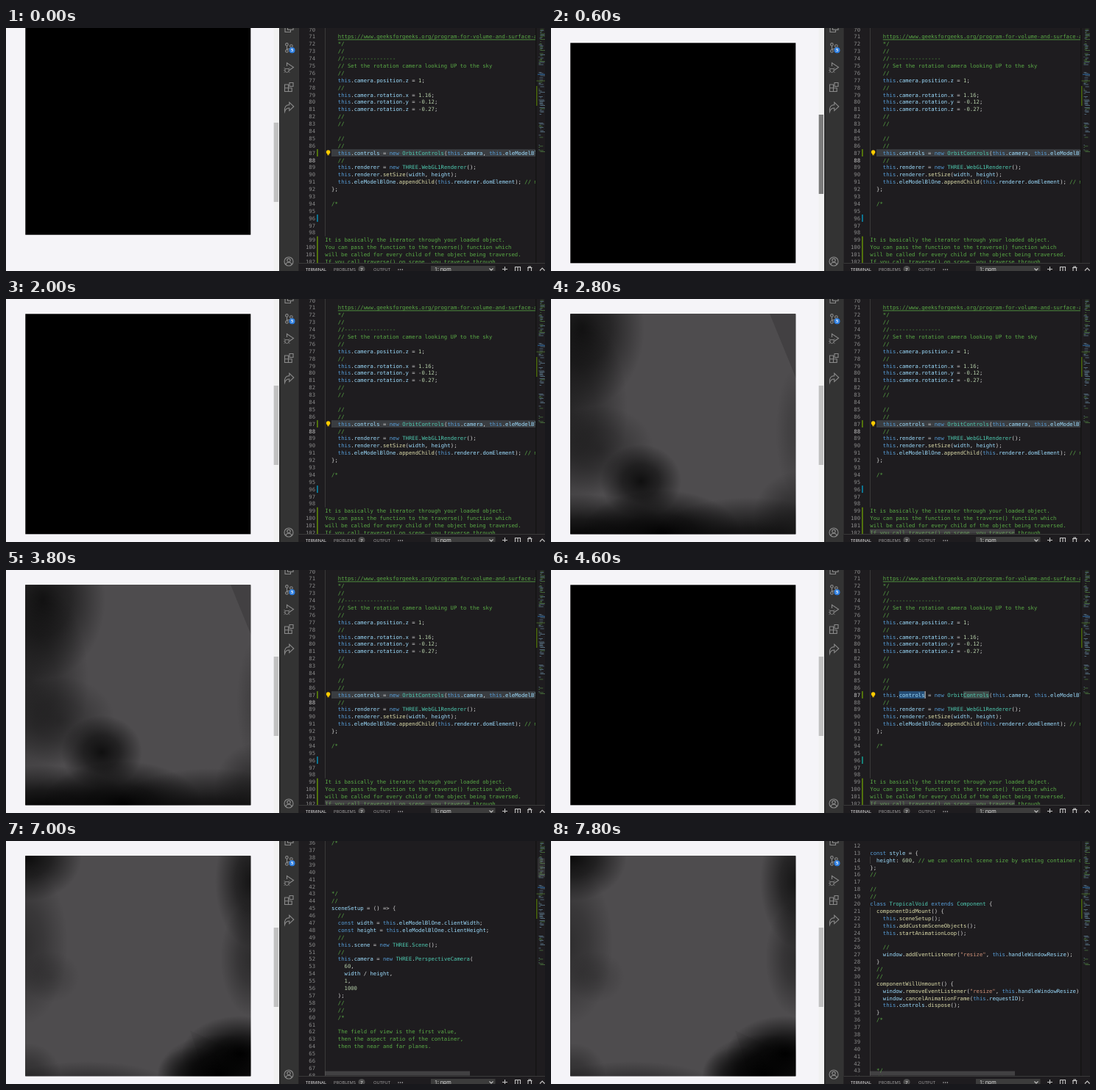
Animation, 732 px wide and 331 px high, one loop 8 s. Source, as an HTML page with a canvas:

```html
<!DOCTYPE html>
<html lang="en">
<head>
<meta charset="utf-8">
<title>Scene and editor</title>
<style>
  html, body { margin: 0; width: 100%; height: 100%; overflow: hidden; background: #f5f4f8; }
  canvas { display: block; }
</style>
</head>
<body>
<canvas id="stage" width="732" height="331"></canvas>
<script>
const ctx = document.getElementById('stage').getContext('2d');
const LOOP = 8000, STEP = 200;
const CHAR = 4.371, LINE = 9.89, CODE_X = 433.3, CODE_END = 719, CODE_BOTTOM = 320;
const FIRST = 12, SCROLL_MAX = 578;
const BOX = { x: 26.3, y: 20.3, w: 306, h: 300 };
const MONO = '7.26px "DejaVu Sans Mono", monospace';
const UI = '"Open Sans", sans-serif';

const C = {
  comment: '#5aaa46', keyword: '#569cd6', type: '#4ec9b0', call: '#dcdcaa',
  name: '#9cdcfe', number: '#b5cea8', string: '#ce9178', plain: '#d4d4d4',
  editor: '#1e1c1f', icon: '#8a8a8a'
};

const code = `
const style = {
  height: 600, // we can control scene size by setting container dimensions
};
//

//
//
class TropicalVoid extends Component {
  componentDidMount() {
    this.sceneSetup();
    this.addCustomSceneObjects();
    this.startAnimationLoop();

    //
    window.addEventListener("resize", this.handleWindowResize);
  }
  //
  //
  componentWillUnmount() {
    window.removeEventListener("resize", this.handleWindowResize);
    window.cancelAnimationFrame(this.requestID);
    this.controls.dispose();
  }
  /*






  */
  //
  sceneSetup = () => {
    //
    const width = this.eleModelBlOne.clientWidth;
    const height = this.eleModelBlOne.clientHeight;
    //
    this.scene = new THREE.Scene();
    //
    this.camera = new THREE.PerspectiveCamera(
      60,
      width / height,
      1,
      1000
    );
    //
    //
    /*

    The field of view is the first value,
    then the aspect ratio of the container,
    then the near and far planes.






    https://www.geeksforgeeks.org/program-for-volume-and-surface-area
    */
    //
    //----------------
    // Set the rotation camera looking UP to the sky
    //
    this.camera.position.z = 1;
    //
    this.camera.rotation.x = 1.16;
    this.camera.rotation.y = -0.12;
    this.camera.rotation.z = -0.27;
    //
    //

    //
    //
    this.controls = new OrbitControls(this.camera, this.eleModelBlOne);
    //
    this.renderer = new THREE.WebGL1Renderer();
    this.renderer.setSize(width, height);
    this.eleModelBlOne.appendChild(this.renderer.domElement); // mount
  };

  /*




It is basically the iterator through your loaded object.
You can pass the function to the traverse() function which
will be called for every child of the object being traversed.
If you call traverse() on scene, you traverse through
the whole scene graph.`.split('\n');

const TOKEN = /\/\/.*|"[^"]*"|\d[\d.]*|\w+|[^\w\s"]/g;

function colorOf(word, rest) {
  if (word.startsWith('//')) return C.comment;
  if (word[0] === '"') return C.string;
  if (/^\d/.test(word)) return C.number;
  if (/^(this|new|const|class|extends)$/.test(word)) return C.keyword;
  if (/^[A-Z]/.test(word)) return C.type;
  if (/^\w/.test(word)) return rest[0] === '(' ? C.call : C.name;
  return C.plain;
}

function tokenize(text) {
  return [...text.matchAll(TOKEN)].map(m =>
    ({ col: m.index, text: m[0], color: colorOf(m[0], text.slice(m.index + m[0].length)) }));
}

let inBlock = false;
const lines = code.map(text => {
  if (text.includes('/*')) inBlock = true;
  const col = text.search(/\S/);
  const tokens = inBlock
    ? (col < 0 ? [] : [{ col, text: text.slice(col), color: C.comment }])
    : tokenize(text);
  if (text.includes('*/')) inBlock = false;
  return tokens;
});
const commented = tokenize('    // ' + code[87 - FIRST].trim());

const colX = col => CODE_X + col * CHAR;

function rect(x, y, w, h, color) {
  ctx.fillStyle = color;
  ctx.fillRect(x, y, w, h);
}

function label(text, x, y, color, font, align = 'left') {
  ctx.font = font;
  ctx.textAlign = align;
  ctx.fillStyle = color;
  ctx.fillText(text, x, y);
}

function disc(x, y, r, color) {
  ctx.fillStyle = color;
  ctx.beginPath();
  ctx.arc(x, y, r, 0, Math.PI * 2);
  ctx.fill();
}

function stroke(d, color = C.icon, width = 1.1) {
  ctx.strokeStyle = color;
  ctx.lineWidth = width;
  ctx.stroke(new Path2D(d));
}

function clip(x, y, w, h, draw) {
  ctx.save();
  ctx.beginPath();
  ctx.rect(x, y, w, h);
  ctx.clip();
  draw();
  ctx.restore();
}

// Dark patches over the cloud: x, y, rx, ry, strength
const SKY_A = [
  [42, 40, 85, 110, .75], [24, 150, 80, 140, .5], [65, 205, 75, 60, .35],
  [122, 248, 55, 50, .8], [40, 328, 130, 62, 1], [150, 322, 110, 62, 1],
  [270, 345, 150, 75, 1], [335, 295, 60, 60, .45], [335, 180, 30, 90, .2]
];
const SKY_B = [
  [28, 22, 75, 60, .85], [24, 140, 60, 110, .4], [60, 185, 40, 35, .18],
  [334, 55, 50, 90, .75], [336, 160, 45, 80, .45], [318, 290, 80, 52, 1],
  [290, 318, 85, 55, 1], [255, 320, 50, 40, .6], [110, 336, 120, 36, .45],
  [30, 320, 45, 45, .4]
];

function patch([x, y, rx, ry, a]) {
  ctx.save();
  ctx.translate(x, y);
  ctx.scale(rx, ry);
  const g = ctx.createRadialGradient(0, 0, 0, 0, 0, 1);
  g.addColorStop(0, `rgba(0,0,0,${a})`);
  g.addColorStop(.45, `rgba(0,0,0,${a * .68})`);
  g.addColorStop(1, 'rgba(0,0,0,0)');
  ctx.fillStyle = g;
  ctx.fillRect(-1, -1, 2, 2);
  ctx.restore();
}

function wedge(d, color) {
  ctx.fillStyle = color;
  ctx.fill(new Path2D(d));
}

function drawSky(t) {
  const early = t < 4200;
  rect(BOX.x, BOX.y, BOX.w, BOX.h, '#4e4c4e');
  ctx.save();
  if (early) ctx.translate((t - 2800) * .008, 0);
  (early ? SKY_A : SKY_B).forEach(patch);
  if (early) wedge('M297 20L345 138V20Z', 'rgba(0,0,0,.16)');
  else wedge('M250 258L332 296V320H270Z', 'rgba(0,0,0,.06)');
  ctx.restore();
}

function drawPage(t) {
  rect(0, 0, 371, 331, '#f5f4f8');
  const scroll = t < 200 ? 38.6 : t < 400 ? 18 : 0;
  rect(BOX.x, BOX.y - scroll, BOX.w, BOX.h, '#000');
  const lit = (t >= 2200 && t < 4200) || t >= 5600;
  if (lit) clip(BOX.x, BOX.y, BOX.w, BOX.h, () => drawSky(t));
  rect(363.5, 0, 7.5, 331, '#f1f1f1');
  const held = t >= 200 && t < 1200;
  rect(363.7, 118 + scroll * 11 / 39, 6.3, 108, held ? '#7b7b7b' : '#c1c1c1');
}

function drawActivityBar() {
  rect(371, 0, 1.5, 331, '#252526');
  rect(372.5, 0, 25, 331, '#333333');
  stroke('M379 -2V5.5H386.5V2.5M382.5 -2V2.5H390V-2');
  // branches
  stroke('M381.5 24.2V29.6M387.3 26.3Q387 28.6 381.7 28.8');
  stroke('M383.2 22.4a1.8 1.8 0 1 1-3.6 0a1.8 1.8 0 1 1 3.6 0M383.2 31.4a1.8 1.8 0 1 1-3.6 0a1.8 1.8 0 1 1 3.6 0M389.2 24.5a1.8 1.8 0 1 1-3.6 0a1.8 1.8 0 1 1 3.6 0');
  disc(388.5, 30.3, 4, '#2f7fe0');
  label('5', 388.5, 32.3, '#fff', `bold 5.5px ${UI}`, 'center');
  // run and debug
  stroke('M381.5 52V47.5L390.5 53.5L385 57.3');
  stroke('M379 55.5h5v2.5a2.5 2.5 0 0 1-5 0ZM377.6 54l1.4 1.5M385.4 54l-1.4 1.5M377.3 57.5h1.7M384 57.5h1.7M377.6 60.5l1.6-1.3M385.4 60.5l-1.6-1.3', C.icon, .9);
  // extensions
  stroke('M378.5 77h5v9.5h-5ZM378.5 81.8h9.7v4.7h-9.7M385 74.5h5v5h-5Z');
  // share
  stroke('M378.5 114Q377.5 104.8 384.8 104.6V101.2L390.8 107L384.8 112.6V109Q380 109 378.5 114Z');
  // account
  stroke('M390 318a6 6 0 1 1-12 0a6 6 0 1 1 12 0M386.2 316.3a2.2 2.2 0 1 1-4.4 0a2.2 2.2 0 1 1 4.4 0M380 322.2q.6-2.9 4-2.9t4 2.9');
}

function drawBulb(y) {
  disc(437.6, y - 1, 2.7, '#ffcc00');
  rect(436.4, y + 1, 2.4, 2.2, '#ffcc00');
  rect(436.7, y + 2.4, 1.8, .8, '#8a6d00');
}

function drawSelection(y, mode) {
  const top = y - 4.9;
  if (mode === 'idle') {
    rect(442, top, CODE_END - 442, LINE, '#3a3d41');
    for (const col of [17, 19, 23]) rect(colX(col) + 1.8, y, .8, .8, '#5c5f62');
  } else if (mode === 'word') {
    rect(colX(9), top, 8 * CHAR, LINE, '#264f78');
    rect(colX(29), top, 8 * CHAR, LINE, '#3f4a48');
  } else {
    rect(CODE_X, top, CODE_END - CODE_X, LINE, '#264f78');
  }
}

function drawCode(t, scroll) {
  const mode = t < 4000 ? 'idle' : t < 5400 ? 'word' : 'all';
  const lineY = n => 11.8 + (n - 71) * LINE + scroll;
  const guide = (a, b) => rect(433, lineY(a) - 4.95, .8, (b - a + 1) * LINE, '#404040');
  const mark = (a, b, color) => rect(422, lineY(a) - 4.95, 1.8, (b - a + 1) * LINE, color);

  guide(14, 14);
  guide(21, 98);
  mark(87, 87, '#587c0c');
  mark(96, 96, t < 4000 ? '#0c7d9d' : '#168a80');
  mark(99, 103, '#587c0c');
  drawSelection(lineY(87), mode);

  const current = mode === 'word' ? 87 : 88;
  lines.forEach((tokens, i) => {
    const n = i + FIRST, y = lineY(n);
    if (y < -8 || y > 330) return;
    label(n, 420, y + 2.6, n === current ? '#c6c6c6' : C.icon, MONO, 'right');
    const shown = n === 87 && mode === 'all' ? commented : tokens;
    clip(CODE_X - 1, 0, CODE_END - CODE_X + 1, CODE_BOTTOM, () => {
      for (const k of shown) label(k.text, colX(k.col), y + 2.6, k.color, MONO);
      if (n === 71) rect(colX(4), y + 3.7, 300, .8, C.comment);
    });
  });

  if (mode !== 'all') drawBulb(lineY(87));
  if (mode === 'word') rect(507.6, lineY(87) - 4.9, 1, LINE, '#d4d4d4');
  if (t >= 2600) rect(433, 313.5, 197, 6, 'rgba(121,121,121,.4)');
}

function drawMinimap(t, p) {
  rect(CODE_END, 0, 13, CODE_BOTTOM, C.editor);
  rect(CODE_END, 0, 1.5, CODE_BOTTOM, '#141414');
  let seed = 7;
  const rnd = () => (seed = seed * 16807 % 2147483647) / 2147483647;
  const gap = y => (y > 50 && y < 60) || (y > 119 && y < 125) || (y > 151 && y < 158);
  for (let y = 0; y < 170; y += 1.5) {
    const x = 723.5 + Math.floor(rnd() * 3), w = 1 + rnd() * 7;
    const green = rnd() < (y > 80 && y < 118 ? .25 : .55);
    if (gap(y) || rnd() < .22) continue;
    rect(x, y, w, .9, green ? 'rgba(95,160,78,.6)' : 'rgba(130,175,205,.55)');
  }
  rect(722, 62.5, 10, 1.5, '#264f78');
  rect(720.5, 71.5, 11.5, 1, '#47672c');
  rect(720.2, 79, 1.2, 27, '#587c0c');
  if (t >= 5600 && t < 7600) rect(722, 48 - p * 42, 10, 26, 'rgba(121,121,121,.22)');
}

function drawPanel() {
  rect(397.5, CODE_BOTTOM, 335, 11, C.editor);
  rect(397.5, CODE_BOTTOM, 335, .8, '#414141');
  const font = `5.8px ${UI}`;
  label('TERMINAL', 407, 331, '#f0f0f0', font);
  label('PROBLEMS', 445, 331, '#a8a8a8', font);
  disc(483, 328.5, 4.6, '#4d4d4d');
  label('7', 483, 330.7, '#fff', `6px ${UI}`, 'center');
  label('OUTPUT', 499, 331, '#a8a8a8', font);
  for (const x of [533, 535.7, 538.4]) disc(x, 329, .75, '#c5c5c5');
  rect(577, 324, 87.5, 7, '#3c3c3c');
  label('1: npm', 582, 331, '#f0f0f0', `7px ${UI}`);
  const ink = '#c5c5c5';
  stroke('M656.5 327.5L659 330L661.5 327.5', ink);
  stroke('M677.5 325V331M674 328.5H681', ink);
  stroke('M691.5 325.5H698.5V332H691.5ZM695 325.5V331', ink);
  stroke('M708 326.5H714.5M710 326V325H712.5V326M709 326.5V331M713.5 326.5V331', ink);
  stroke('M725 330.5L728.3 327L731.6 330.5', ink);
}

function draw(t) {
  const q = Math.min(1, Math.max(0, (t - 6000) / 1800));
  const p = q * q * (3 - 2 * q);
  drawPage(t);
  rect(397.5, 0, 335, 331, C.editor);
  clip(397.5, 0, 335, CODE_BOTTOM, () => {
    drawCode(t, Math.round(p * SCROLL_MAX));
    drawMinimap(t, p);
  });
  drawActivityBar();
  drawPanel();
}

const start = performance.now();
function tick() {
  const t = (performance.now() - start) % LOOP;
  draw(Math.floor(t / STEP) * STEP);
  requestAnimationFrame(tick);
}
tick();
</script>
</body>
</html>
```
